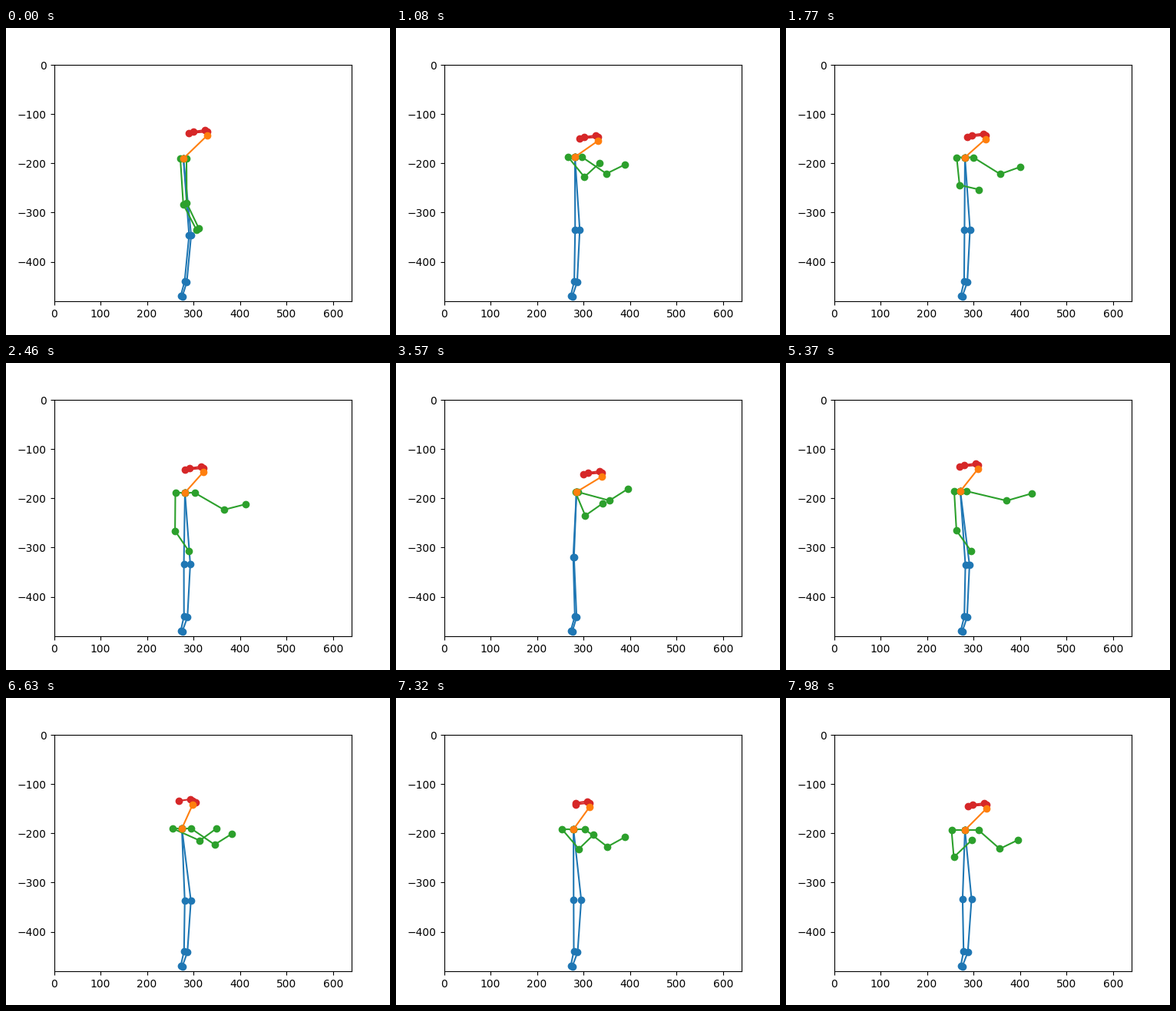
These frames come from a looping animation (500 px wide and 400 px high, 8 s). A matplotlib script:

```python
import numpy as np
import matplotlib.pyplot as plt
from matplotlib.animation import FuncAnimation

FRAMES, INTERVAL, STEP = 250, 32, 30

# Key poses in stage pixels, by time in ms: neck, nose, right wrist,
# left wrist, then half the shoulder width and the height of the hips.
POSES = {
    0:    [231, 170, 262, 140, 248, 263, 251, 261, 4, 270],
    1080: [233, 168, 263, 147, 265, 176, 298, 178, 9, 263],
    2460: [233, 169, 257, 142, 238, 245, 312, 184, 12.5, 262],
    3570: [235, 168, 268, 148, 269, 183, 302, 164, 1.5, 253],
    5370: [227, 167, 250, 138, 241, 245, 320, 170, 8, 263],
    6630: [229, 170, 243, 139, 274, 170, 294, 177, 12, 264],
    7980: [233, 172, 261, 144, 242, 185, 302, 185, 17.5, 262],
}
TIMES = list(POSES)
KEYS = np.array(list(POSES.values()), float)

# Wrists and shoulder width at the far end of a swing.
REACH_COLS = slice(4, 9)
REACH = np.array([242, 242, 327, 173, 14])
SWING_MS = 600


def controls(t):
    i = min(np.searchsorted(TIMES, t, side="right") - 1, len(TIMES) - 2)
    span = TIMES[i + 1] - TIMES[i]
    u = (t - TIMES[i]) / span
    ease = (1 - np.cos(np.pi * u)) / 2
    row = KEYS[i] + (KEYS[i + 1] - KEYS[i]) * ease
    swing = np.sin(np.pi * round(span / SWING_MS) * u) ** 2
    row[REACH_COLS] += (REACH - row[REACH_COLS]) * swing
    return row


def arm(neck, side, half, wrist):
    """The elbow sags more the closer the wrist is to the shoulder."""
    shoulder = neck + [side * half, 0]
    chord = wrist - shoulder
    dist = max(np.hypot(*chord), 20)
    down = np.array([-chord[1], chord[0]]) / dist
    elbow = shoulder + 0.62 * chord + 900 / dist * down
    return [neck, shoulder, elbow, wrist]


def leg(neck, side, half, hip_y):
    """The hips sway forward as they drop and turn with the shoulders."""
    hip = [236 + (hip_y - 262.5) / 2 + side * half / 3, hip_y]
    knee = [234 + side * (1 + half / 10), 330.5 + side * 0.5]
    ankle = [228.5 + side, 349.5 + side * 0.5]
    return [neck, hip, knee, ankle]


def face(neck, nose):
    """The left ear comes forward as the head turns to the front."""
    left_ear = np.interp(nose[0] - neck[0], [14, 23], [4, -24])
    right = nose + [[-3, -7], [-18, -5]]
    left = nose + [[0, -5], [left_ear, -3]]
    return [right, left]


def skeleton(t):
    row = controls(t)
    neck, nose, right, left = row[:8].reshape(4, 2)
    half, hip_y = row[8:]
    return [
        leg(neck, -1, half, hip_y), leg(neck, 1, half, hip_y),
        arm(neck, -1, half, right), arm(neck, 1, half, left),
        *face(neck, nose),
        [neck, nose],
    ]


def to_data(points):
    x, y = np.asarray(points).T
    return (x - 62.5) * 640 / 387.5, (48 - y) * 480 / 308


fig, ax = plt.subplots(figsize=(5, 4), dpi=100)
ax.set_xlim(0, 640)
ax.set_ylim(-480, 0)

COLORS = ["C0", "C0", "C2", "C2", "C3", "C3", "C1"]
lines = [ax.plot([], [], "o-", color=c)[0] for c in COLORS]


def draw(frame):
    t = STEP * round((frame * INTERVAL + 14) / STEP)
    for line, chain in zip(lines, skeleton(t)):
        line.set_data(*to_data(chain))
    return lines


anim = FuncAnimation(fig, draw, frames=FRAMES, interval=INTERVAL,
                     repeat=True, repeat_delay=0)
plt.show()
```
